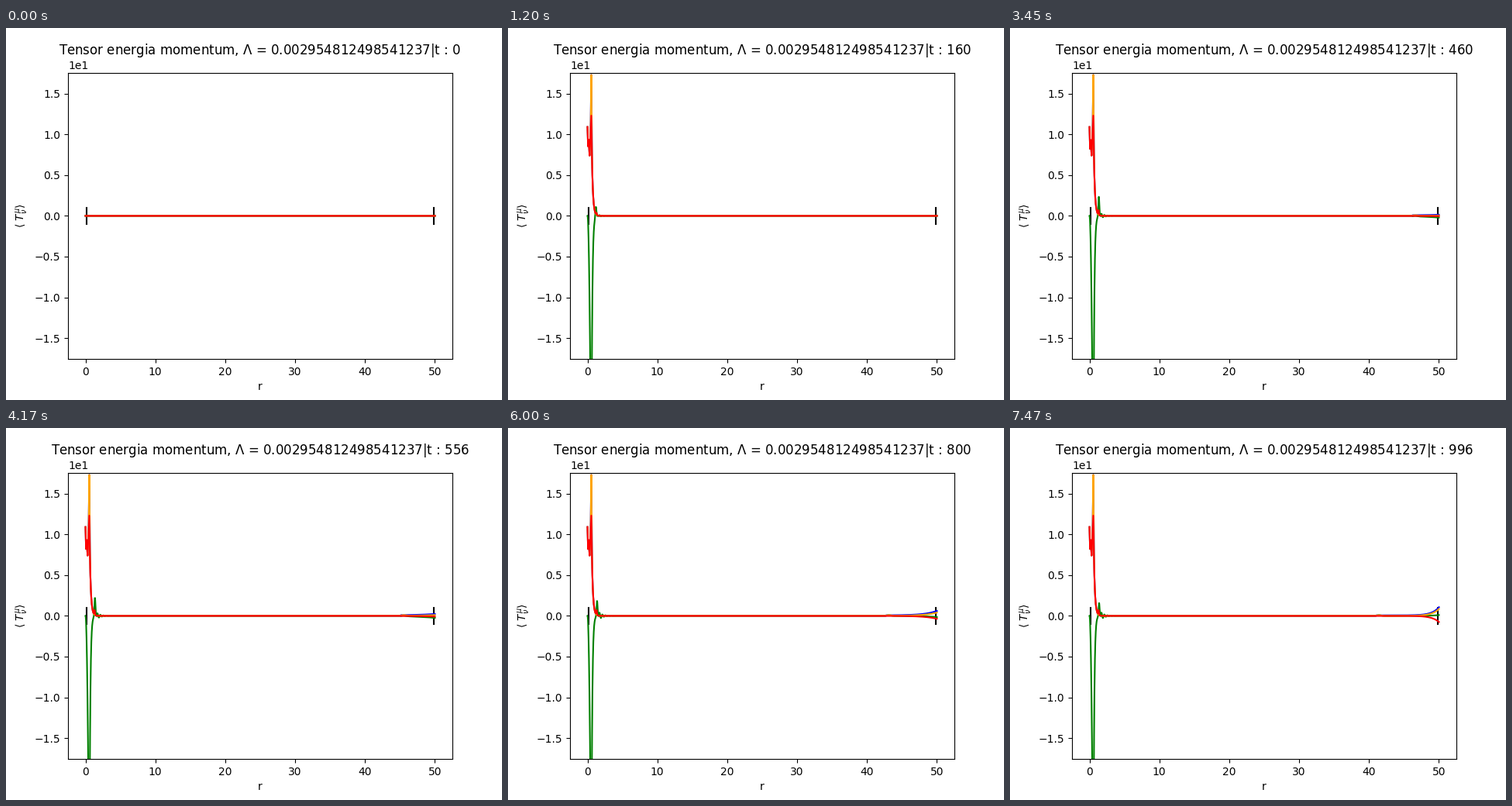
Recreate the animation shown at these times as a matplotlib script. Size 640 px wide and 480 px high, loop 7500 ms.

```python
import numpy as np
import matplotlib.pyplot as plt
from matplotlib.animation import FuncAnimation

FRAMES, INTERVAL, STEP = 250, 30, 4
LAM = "0.002954812498541237"
PEAK = .55

r = np.linspace(0, 50, 5001)


def bump(center, width):
    return np.exp(-((r - center) / width) ** 2)


def decay(start, length):
    return np.exp(-np.clip(r - start, 0, None) / length)


# Settled profiles near the centre
inner = np.interp(r, [0, .08, .17, .3, PEAK], [10.9, 8.2, 9.3, 7.4, 12.3])
red_core = inner * decay(PEAK, .165)
orange_core = red_core + 5 * bump(PEAK, .07)
green_core = -36 * np.clip(r / PEAK, 0, 1) ** 2 * decay(PEAK, .12)


def crest(t, settle):
    """First green crest with the ripples trailing outside it."""
    height = 3.45 * np.exp(-t / 1300) * settle
    center = 1.38 - .4 * np.exp(-t / 200)
    wave = np.cos(2 * np.pi * (r - 1.72) / .42) * decay(1.6, .5) * (r > 1.6)
    return height * bump(center, .1) + .5 * min(t / 700, 1) * wave


def profiles(t):
    grow = 1 - np.exp(-t / 20)
    settle = 1 - np.exp(-(t / 220) ** 2)
    dip = 2 * np.exp(-t / 100) * bump(.1, .05)

    # Disturbance entering from the outer boundary
    s = np.clip((t - 240) / 756, 0, 1)
    front = 50 - 9 * s ** .7
    edge = np.exp((r - 50) / (4 - 3 * s)) * (r > front)
    head = .08 * min(3 * s, 1) * bump(front + .4, .4)
    swell = .06 * min(3 * s, 1) * (r > front)

    return {
        "blue": grow * (orange_core + dip) + s ** 2 * edge + swell,
        "green": grow * green_core + crest(t, settle) + head
        + (.1 * s - .3 * np.sin(np.pi * s)) * edge,
        "orange": grow * (orange_core + dip) + .85 * s ** 2.5 * edge + head,
        "red": grow * (red_core + dip) + .6 * settle * bump(1.3, .07)
        - .75 * s ** 2.5 * edge,
    }


fig, ax = plt.subplots(figsize=(6.4, 4.8), dpi=100)
for x in (.2, 49.8):
    ax.plot([x, x], [-1, 1], color="black")
lines = {c: ax.plot(r, 0 * r, color=c, snap=False)[0]
         for c in ("blue", "green", "orange", "red")}
ax.set_xlim(-2.5, 52.5)
ax.set_ylim(-17.57, 17.57)
ax.ticklabel_format(axis="y", style="sci", scilimits=(0, 0))
ax.set_xlabel("r")
ax.set_ylabel(r"$\langle\ T^{\mu}_{\nu} \rangle$")
title = ax.set_title("")


def update(i):
    t = STEP * i
    for c, y in profiles(t).items():
        lines[c].set_ydata(y)
    title.set_text(rf"Tensor energia momentum, $\Lambda$ = {LAM}|t : {t}")
    return [*lines.values(), title]


anim = FuncAnimation(fig, update, frames=FRAMES, interval=INTERVAL,
                     repeat=True, repeat_delay=0, blit=False)
plt.show()
```
